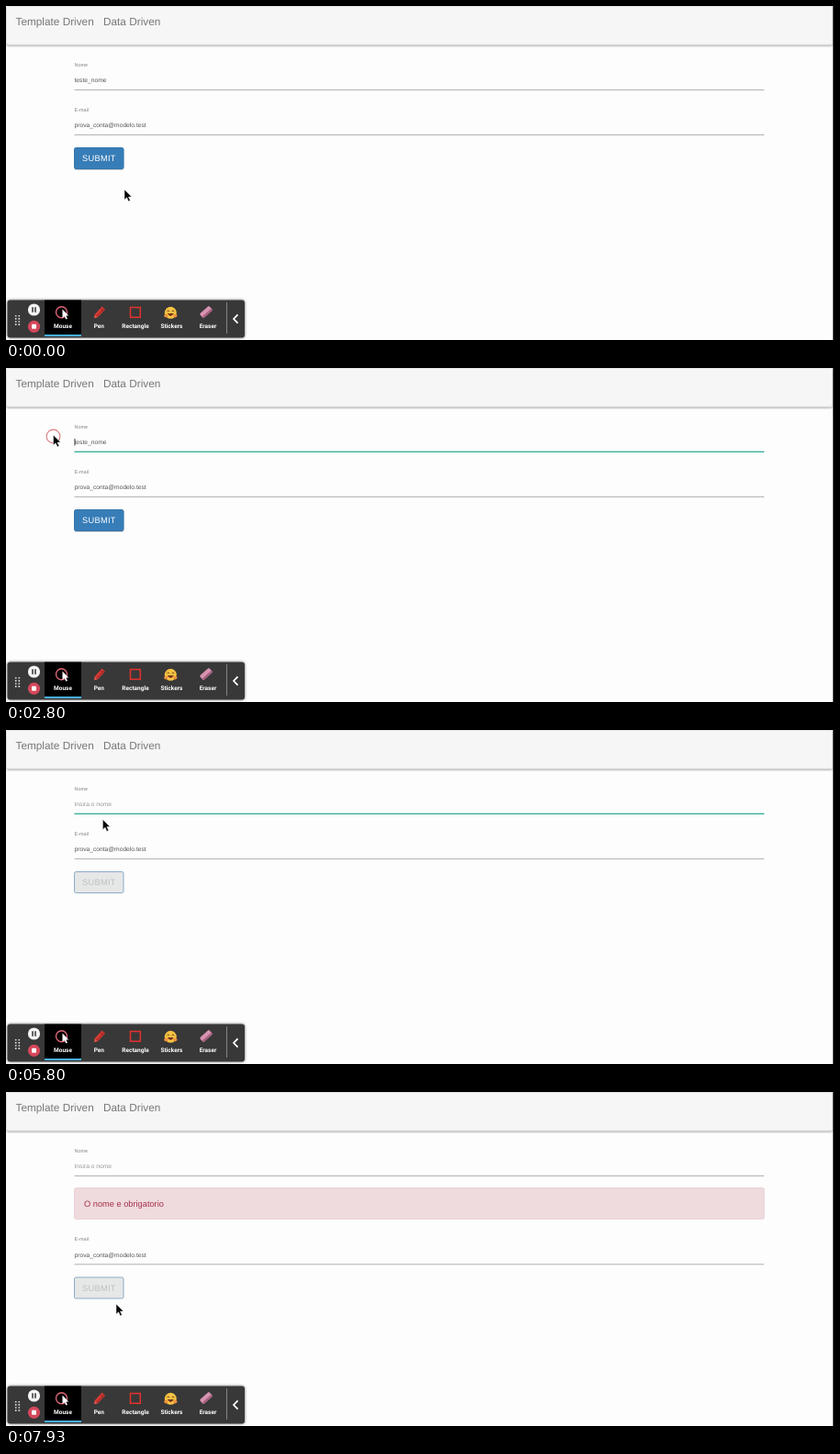
Recreate the animation shown at these times as an HTML page. Size 902 by 364 pixels, loop 8000 ms.

```html
<!DOCTYPE html>
<html lang="pt">
<head>
<meta charset="utf-8">
<title>Form validation demo</title>
<style>
  html, body { margin: 0; width: 100%; height: 100%; overflow: hidden; background: #fdfdfd; }
  svg { display: block; width: 902px; height: 364px; }
  text { font-family: "Liberation Sans", Arial, sans-serif; text-rendering: geometricPrecision; }
  .nav { font-size: 11.8px; fill: #777; }
  .label { font-size: 5.5px; fill: #858585; }
  .input { font-size: 6.7px; fill: #555; }
  .hint { font-size: 6.7px; fill: #999; }
  .button { font-size: 9.26px; letter-spacing: .3px; }
  .error { font-size: 9.26px; fill: #a6324a; }
  .tool { font: 700 6.5px Roboto, sans-serif; fill: #fff; text-anchor: middle; }
  .rule { fill: #a8a8a8; }
</style>
</head>
<body>
<svg viewBox="0 0 902 364">
  <defs>
    <filter id="soft" x="-10%" y="-30%" width="120%" height="170%">
      <feDropShadow dx="0" dy="1" stdDeviation="1.2" flood-opacity=".45"/>
    </filter>
    <filter id="halo" x="-10%" y="-30%" width="120%" height="170%">
      <feDropShadow dx="0" dy="0" stdDeviation="1.8" flood-opacity=".6"/>
    </filter>
    <path id="arrow" d="M0 0V11.2L2.6 8.8L4.5 13L6.4 12.1L4.5 8.1H8Z"/>
  </defs>

  <rect width="902" height="364" fill="#fdfdfd"/>
  <rect x=".5" y=".5" width="900" height="41.5" rx="2" fill="#f6f6f6" stroke="#e2e2e2" stroke-width=".6" filter="url(#soft)"/>
  <text class="nav" x="10.5" y="21">Template Driven</text>
  <text class="nav" x="106" y="21">Data Driven</text>

  <text class="label" x="74.5" y="65.7">Nome</text>
  <text class="hint" id="hint" x="74.5" y="83.2">Insira o nome</text>
  <text class="input" id="name" x="74.5" y="83.2"></text>
  <rect class="rule" x="74.5" y="90.9" width="751.5" height=".9"/>
  <rect id="focus" x="74.5" y="90.7" width="751.5" height="1.3" fill="#35b19b"/>
  <rect id="caret" y="77" width=".9" height="7.6" fill="#333"/>

  <g id="alert">
    <rect x="74.5" y="104.5" width="751.5" height="34" rx="2" fill="#efdadd" stroke="#e6c8ce" stroke-width=".7"/>
    <text class="error" x="85" y="125">O nome e obrigatorio</text>
  </g>

  <g id="lower">
    <text class="label" x="74.5" y="114.7">E-mail</text>
    <text class="input" x="74.5" y="132.2">prova_conta@modelo.test</text>
    <rect class="rule" x="74.5" y="139.9" width="751.5" height=".9"/>
    <g id="enabled">
      <rect x="74.5" y="155" width="54" height="24" rx="2" fill="#000" opacity=".18"/>
      <rect x="74.5" y="154.5" width="53.5" height="23" rx="1.8" fill="#377db7" stroke="#3375ac"/>
      <text class="button" x="83" y="169.3" fill="#fff">SUBMIT</text>
    </g>
    <g id="disabled">
      <rect x="74.5" y="154.5" width="53.5" height="23" rx="1.8" fill="#e6e7e7" stroke="#8aabc8"/>
      <text class="button" x="83" y="169.3" fill="#bcbfc1">SUBMIT</text>
    </g>
  </g>

  <g id="toolbar">
    <rect x="1.5" y="320.5" width="258.5" height="41" rx="3" fill="#373737" filter="url(#halo)"/>
    <path d="M10.7 337V348M14.3 337V348" stroke="#ddd" stroke-width="1.6" stroke-dasharray="1.6 1.5"/>
    <circle cx="30.5" cy="331" r="6.6" fill="#f4f4f4"/>
    <path d="M29 328.2V333.8M32 328.2V333.8" stroke="#333" stroke-width="1.5"/>
    <circle cx="30.5" cy="349.3" r="6.6" fill="#d4475a"/>
    <rect x="28" y="346.8" width="5" height="5" rx=".7" fill="#fff"/>
    <rect x="42" y="320.5" width="40" height="39.5" fill="#000"/>
    <rect x="42" y="358" width="40" height="2" fill="#45aeea"/>
    <circle cx="60.5" cy="333.8" r="6" fill="none" stroke="#df6577" stroke-width="1.4"/>
    <use href="#arrow" transform="translate(61.5 330.5) scale(.85)" fill="#fff"/>
    <g transform="translate(101.5 334.3) rotate(-47)">
      <path d="M-8.3 0L-4.5 -2.3V2.3Z" fill="#e0564a"/>
      <path d="M-4.7 -2.3H7V2.3H-4.7Z" fill="#dc3b35"/>
      <path d="M-4.7 .7H7M4.4 -2.2V2.2" stroke="#9e2725"/>
    </g>
    <rect x="135.5" y="328.5" width="10.8" height="10.8" fill="none" stroke="#e3322d" stroke-width="1.5"/>
    <g transform="translate(-.7 0)">
      <circle cx="180" cy="334.3" r="6.5" fill="#f6c343"/>
      <path d="M176 333Q177.4 330.7 178.7 333M181.3 333Q182.7 330.7 184 333" fill="none" stroke="#5b371b" stroke-width=".9"/>
      <path d="M176.5 335H183.5Q180 340.8 176.5 335Z" fill="#793522"/>
      <ellipse cx="175" cy="337.6" rx="2.2" ry="1.8" fill="#ee923c"/>
      <ellipse cx="185" cy="337.6" rx="2.2" ry="1.8" fill="#ee923c"/>
    </g>
    <g transform="translate(218 333.5) rotate(-42)">
      <rect x="-6.8" y="-3.2" width="13.6" height="6.4" rx="1.3" fill="#d993b2"/>
      <rect x="-6.8" y="1" width="13.6" height="2.2" rx="1" fill="#a8607f"/>
    </g>
    <path d="M240.5 323V357" stroke="#858585"/>
    <path d="M252.5 336.3L248 341L252.5 345.7" fill="none" stroke="#fff" stroke-width="1.7"/>
    <text class="tool" x="62" y="351.2">Mouse</text>
    <text class="tool" x="101.3" y="351.2">Pen</text>
    <text class="tool" x="141" y="351.2">Rectangle</text>
    <text class="tool" x="180.4" y="351.2">Stickers</text>
    <text class="tool" x="220" y="351.2">Eraser</text>
  </g>

  <rect x="900.8" width="1.2" height="364" fill="#111"/>

  <g id="pointer">
    <circle id="ring" cy="1.5" r="7.4" fill="none" stroke="#dc7b80" stroke-width="1.1"/>
    <use id="tip" href="#arrow" fill="#050505" stroke="#fff" stroke-width=".5"/>
    <path id="beam" d="M-2 -5.3Q0 -5.3 0 -4Q0 -5.3 2 -5.3M0 -4.4V4.4M-2 5.3Q0 5.3 0 4Q0 5.3 2 5.3" fill="none" stroke="#666" stroke-width=".8"/>
  </g>
</svg>
<script>
  const LOOP = 8000, ERROR_AT = 7330, FOCUS_AT = 2330, ERROR_SHIFT = 47.5;
  const FIELD_X = 74.5, VALUE = 'teste_nome';
  const FIRST_KEY = 4200, REPEAT_FROM = 4705, REPEAT_MS = 28;
  const EMPTY_AT = REPEAT_FROM + 8 * REPEAT_MS;
  const caretResets = [FOCUS_AT, 3430, FIRST_KEY, EMPTY_AT];
  const presses = [[FOCUS_AT, 2900], [3330, 3440], [ERROR_AT, 7440]];

  // time, x, y
  const path = [
    [0, 129, 200], [30, 129, 200], [400, 143, 193], [1060, 193, 148],
    [1700, 236.5, 99], [1740, 236.5, 99], [2060, 76, 81], [2330, 76, 81],
    [2560, 57, 83], [2780, 51.5, 73], [2820, 51.5, 73], [3440, 115, 82],
    [5300, 115, 82], [5660, 106, 97], [5770, 106, 97], [6200, 46, 139],
    [6560, 0, 172], [6660, 5, 177], [7130, 66, 225], [7330, 66, 225],
    [7930, 120, 231], [8000, 120, 231]
  ];

  const el = {};
  document.querySelectorAll('svg [id]').forEach(node => el[node.id] = node);
  const clamp = v => Math.min(1, Math.max(0, v));
  const show = (node, on) => node.setAttribute('visibility', on ? 'visible' : 'hidden');
  const fade = (node, amount) => node.setAttribute('opacity', amount);
  const easeOut = v => 1 - (1 - clamp(v)) ** 2.5;

  // Speed along one axis at a waypoint; zero wherever the pointer rests.
  function speed(i, axis) {
    const a = path[i - 1], b = path[i], c = path[i + 1];
    const rests = (p, q) => p[1] === q[1] && p[2] === q[2];
    if (!a || !c || rests(a, b) || rests(b, c)) return 0;
    return (c[axis] - a[axis]) / (c[0] - a[0]);
  }

  function pointerAt(t) {
    const i = Math.max(1, path.findIndex(p => p[0] > t));
    const a = path[i - 1], b = path[i], span = b[0] - a[0];
    const u = clamp((t - a[0]) / span), v = 1 - u;
    return [1, 2].map(axis =>
      v * v * (1 + 2 * u) * a[axis] + u * u * (3 - 2 * u) * b[axis] +
      span * u * v * (v * speed(i - 1, axis) - u * speed(i, axis)));
  }

  function lettersAt(t) {
    if (t < FIRST_KEY) return VALUE.length;
    if (t < REPEAT_FROM) return VALUE.length - 1;
    return Math.max(0, VALUE.length - 2 - Math.floor((t - REPEAT_FROM) / REPEAT_MS));
  }

  function render(t) {
    const failed = t >= ERROR_AT;
    const shift = failed ? ERROR_SHIFT : 0;
    const focused = t >= FOCUS_AT && !failed;
    const letters = lettersAt(t);

    el.name.textContent = VALUE.slice(0, letters);
    show(el.hint, letters === 0);
    fade(el.focus, easeOut((t - FOCUS_AT) / 300) * (1 - easeOut((t - ERROR_AT) / 300)));

    const reset = caretResets.filter(r => r <= t).pop();
    const offset = t < caretResets[1] || !letters ? 0 : el.name.getComputedTextLength();
    el.caret.setAttribute('x', FIELD_X + offset);
    show(el.caret, focused && (t - reset) % 1000 < 500);

    show(el.alert, failed);
    el.lower.setAttribute('transform', `translate(0 ${shift})`);
    const dimmed = easeOut((t - EMPTY_AT) / 200);
    fade(el.disabled, dimmed);
    show(el.enabled, dimmed < 1);

    const [x, y] = pointerAt(t);
    const inField = (top, bottom) => x >= FIELD_X && x <= 826 && y >= top && y <= bottom;
    const overText = inField(71, 91) || inField(120 + shift, 140 + shift);
    el.pointer.setAttribute('transform', `translate(${x} ${y})`);
    show(el.tip, !overText);
    show(el.beam, overText);
    show(el.ring, presses.some(([from, to]) => t >= from && t < to));
  }

  const start = performance.now();
  function tick() {
    render((performance.now() - start) % LOOP);
    requestAnimationFrame(tick);
  }
  tick();
</script>
</body>
</html>
```
